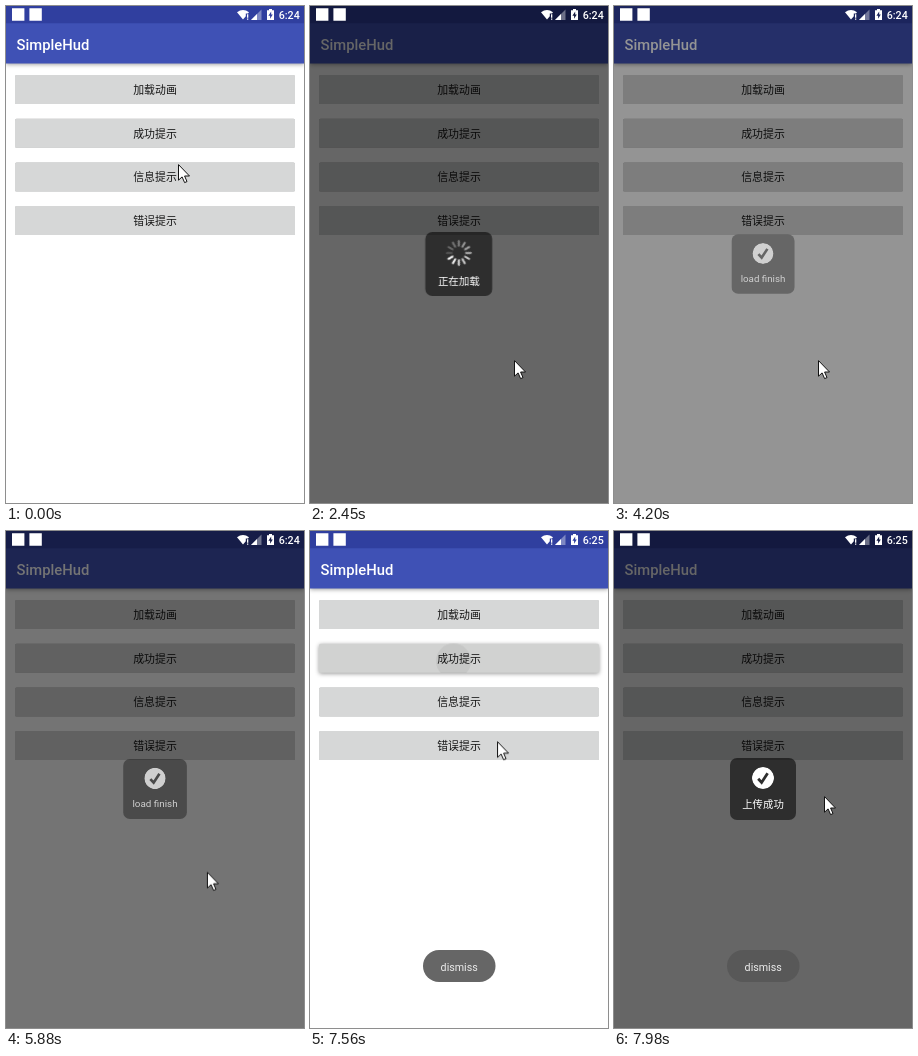
Animation of 298 by 497 pixels, one loop 8000 ms. Source, as an HTML page:

```html
<!DOCTYPE html>
<html lang="zh-CN">
<head>
<meta charset="utf-8">
<title>SimpleHud</title>
<style>
html, body { margin: 0; width: 100%; height: 100%; overflow: hidden; background: #fff; }
svg { display: block; font-family: Roboto, "Noto Sans CJK SC", "Noto Sans CJK", sans-serif; }
.mid { text-anchor: middle; }
.label { font-size: 10.9px; fill: #161616; }
.hud text { font-size: 10.4px; fill: #fff; }
.hud .latin { font-size: 10.2px; }
.bar { filter: drop-shadow(0 1px 2px rgba(0, 0, 0, .38)); }
.btn { fill: #d6d7d7; filter: drop-shadow(0 .7px .7px rgba(0, 0, 0, .28)); }

/* every part shares one 8 s loop; 1% = 80 ms */
.anim { animation: 8s linear infinite; }
#press1 { animation-name: press1; }
#press2 { animation-name: press2; }
#ripple1 { animation-name: ripple1; }
#ripple2 { animation-name: ripple2; }
#dim { animation-name: dim; }
#loading { animation-name: loading; }
#finish { animation-name: finish; }
#upload { animation-name: upload; }
#spinner { animation-name: spin; }
#toast { animation-name: toast; }
#early { animation-name: early; }
#late { animation-name: late; }
#cursor { animation-name: cursor; }

@keyframes press1 {
  0%, 16.5%, 19.25%, 100% { fill: #d6d7d7; filter: drop-shadow(0 .7px .7px rgba(0, 0, 0, .28)); }
  17.6%, 18.25% { fill: #d1d2d1; filter: drop-shadow(0 1.5px 2px rgba(0, 0, 0, .4)); }
}
@keyframes press2 {
  0%, 93%, 96.25%, 100% { fill: #d6d7d7; filter: drop-shadow(0 .7px .7px rgba(0, 0, 0, .28)); }
  94.1%, 94.75% { fill: #d1d2d1; filter: drop-shadow(0 1.5px 2px rgba(0, 0, 0, .4)); }
}
@keyframes ripple1 {
  0%, 16.25% { transform: scale(0); opacity: .05; }
  19.25% { transform: scale(1); opacity: .05; }
  22.5%, 100% { transform: scale(2.1); opacity: 0; }
}
@keyframes ripple2 {
  0%, 92.75% { transform: scale(0); opacity: .055; }
  94.5% { transform: scale(.6); opacity: .055; }
  99%, 100% { transform: scale(2.1); opacity: 0; }
}
@keyframes dim {
  0%, 18.75% { opacity: 0; }
  22.25%, 49.375% { opacity: .6; }
  52.125% { opacity: .39; }
  55%, 73.125% { opacity: .6; }
  77.5%, 96% { opacity: 0; }
  99.5%, 100% { opacity: .6; }
}
@keyframes loading {
  0% { opacity: 0; transform: scale(.9); }
  18.375% { opacity: 0; transform: scale(.9); animation-timing-function: cubic-bezier(.5, 1, .89, 1); }
  20.25%, 49.125% { opacity: 1; transform: scale(1); }
  51.375%, 100% { opacity: 0; transform: scale(.9); }
}
@keyframes finish {
  0% { opacity: 0; transform: scale(.9); }
  51.875% { opacity: 0; transform: scale(.9); animation-timing-function: cubic-bezier(.5, 1, .89, 1); }
  53.75%, 72.75% { opacity: 1; transform: scale(1); }
  75%, 100% { opacity: 0; transform: scale(.9); }
}
@keyframes upload {
  0% { opacity: 0; transform: scale(.9); }
  95.625% { opacity: 0; transform: scale(.9); animation-timing-function: cubic-bezier(.5, 1, .89, 1); }
  97.5%, 100% { opacity: 1; transform: scale(1); }
}
@keyframes spin {
  0% { transform: rotate(540deg); }
  18.0875% { transform: rotate(540deg); animation-timing-function: steps(36); }
  51.8375%, 100% { transform: rotate(1620deg); }
}
@keyframes toast {
  0%, 76.25% { opacity: 0; }
  80%, 100% { opacity: 1; }
}
@keyframes early { 0%, 78.74% { opacity: 1; } 78.75%, 100% { opacity: 0; } }
@keyframes late { 0%, 78.74% { opacity: 0; } 78.75%, 100% { opacity: 1; } }
@keyframes cursor {
  0%, .25% { transform: translate(172px, 158px); }
  2.625%, 3.75% { transform: translate(153px, 125px); }
  7.875%, 10% { transform: translate(134px, 79px); }
  13.125%, 16.25% { transform: translate(141px, 84px); }
  19.25% { transform: translate(168px, 144px); }
  25.375%, 72.75% { transform: translate(204px, 354px); }
  83.125% { transform: translate(162px, 173px); }
  84.875%, 88.75% { transform: translate(145px, 141px); }
  89.25%, 92.25% { transform: translate(143px, 132px); }
  94.5% { transform: translate(187px, 210px); }
  99.75%, 100% { transform: translate(210px, 265px); }
}
</style>
</head>
<body>
<svg width="298" height="497" viewBox="0 0 298 497">
  <defs>
    <clipPath id="clip1"><rect x="9" y="69" width="280" height="29" rx="1.5"/></clipPath>
    <clipPath id="clip2"><rect x="9" y="112.7" width="280" height="29" rx="1.5"/></clipPath>
    <mask id="cut" maskUnits="userSpaceOnUse" x="-12" y="-23" width="24" height="24">
      <circle cy="-11" r="11" fill="#fff"/>
      <path d="M-4.8-10.3L-1.4-6.6L4.6-15.8" fill="none" stroke="#000" stroke-width="2.8"/>
    </mask>
    <g id="tick">
      <rect x="-33" y="-31" width="66" height="62" rx="7" fill-opacity=".55"/>
      <circle cy="-11" r="11" fill="#fff" mask="url(#cut)"/>
    </g>
  </defs>

  <rect width="298" height="497" fill="#fff"/>
  <rect class="bar" y="10" width="298" height="47.5" fill="#3f51b5"/>
  <rect width="298" height="17.3" fill="#303f9f"/>
  <text x="10.6" y="44" font-size="14.8" font-weight="500" fill="#fff">SimpleHud</text>

  <rect id="press1" class="btn anim" x="9" y="69" width="280" height="29" rx="1.5"/>
  <rect id="press2" class="btn anim" x="9" y="112.7" width="280" height="29" rx="1.5"/>
  <rect class="btn" x="9" y="156.4" width="280" height="29" rx="1.5"/>
  <rect class="btn" x="9" y="200.1" width="280" height="29" rx="1.5"/>
  <g clip-path="url(#clip1)"><g transform="translate(142 84)"><circle id="ripple1" class="anim" r="29"/></g></g>
  <g clip-path="url(#clip2)"><g transform="translate(143.5 130)"><circle id="ripple2" class="anim" r="29"/></g></g>
  <g class="label mid">
    <text x="149" y="88.2">加载动画</text>
    <text x="149" y="131.8">成功提示</text>
    <text x="149" y="175.4">信息提示</text>
    <text x="149" y="219.1">错误提示</text>
  </g>

  <rect id="dim" class="anim" width="298" height="497"/>

  <!-- status icons stay bright above the dimming -->
  <g fill="#fff">
    <path d="M6 2.3h12.4v12.4H6zM23.4 2.3h12.4v12.4H23.4z"/>
    <path d="M231 6.2Q237 1.8 243 6.2L242 7.4H239.8V10.2L237 13.6Z"/>
    <path d="M241 8.2h1.3v3.6H241zM241 12.5h1.3v1.3H241z"/>
    <path d="M245 14L255.5 3.5V14Z" fill-opacity=".38"/>
    <path d="M245 14L251 8V14Z"/>
    <path fill-rule="evenodd" d="M261 4.2H263V3H266V4.2H268V14H261ZM265.2 5.6L262.4 9.8H264.1V12.8L266.8 8.5H265.2Z"/>
    <g font-size="10.7" font-weight="500">
      <text id="early" class="anim" x="272.7" y="12.8">6:24</text>
      <text id="late" class="anim" x="272.7" y="12.8">6:25</text>
    </g>
  </g>

  <g id="toast" class="anim">
    <rect x="113" y="419" width="72.5" height="32" rx="16" fill="#575757" fill-opacity=".91"/>
    <text class="mid" x="149.2" y="439.7" font-size="10.7" fill="#ececec">dismiss</text>
  </g>

  <g transform="translate(148.8 258)">
    <g id="loading" class="hud anim">
      <rect x="-33.5" y="-32" width="67" height="64" rx="7" fill-opacity=".55"/>
      <g transform="translate(0 -11)"><g id="spinner" class="anim" stroke="#fff" stroke-width="2.1" stroke-linecap="round"></g></g>
      <text class="mid" y="21">正在加载</text>
    </g>
  </g>
  <g transform="translate(149 258)">
    <g id="finish" class="hud anim">
      <use href="#tick"/>
      <text class="mid latin" y="18.5">load finish</text>
    </g>
    <g id="upload" class="hud anim">
      <use href="#tick"/>
      <text class="mid" y="18.5">上传成功</text>
    </g>
  </g>

  <path id="cursor" class="anim" d="M.5.6V16.2L4.1 12.9L6.6 18.6L9 17.6L6.6 12H11.5Z" fill="#fff" stroke="#111" stroke-width="1" stroke-linejoin="round"/>
</svg>
<script>
// twelve spokes, brightest at 30 degrees and fading counter-clockwise
const spinner = document.getElementById("spinner");
for (let i = 0; i < 12; i++) {
  const spoke = document.createElementNS("http://www.w3.org/2000/svg", "line");
  const attrs = { y1: -7.3, y2: -11.8, transform: `rotate(${30 - 30 * i})`, "stroke-opacity": 1 - 0.8 * i / 11 };
  for (const key in attrs) spoke.setAttribute(key, attrs[key]);
  spinner.append(spoke);
}
</script>
</body>
</html>
```
